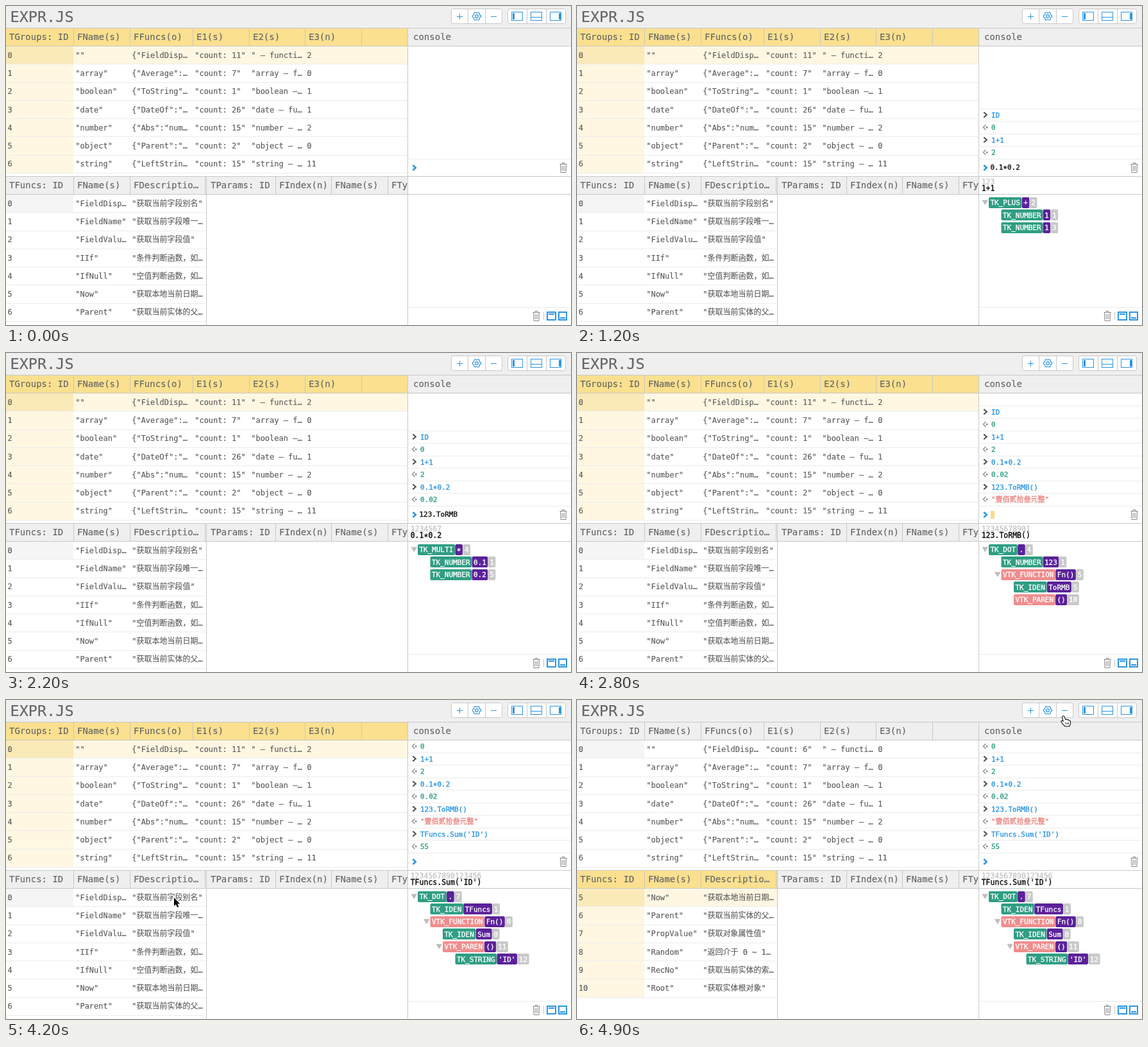
Animation of 881 by 497 pixels, one loop 5 s. Source, as an HTML page with a canvas:

```html
<!DOCTYPE html>
<html lang="en">
<head>
<meta charset="utf-8">
<title>EXPR.JS</title>
<style>
html, body { margin: 0; width: 100%; height: 100%; overflow: hidden; background: #fff; }
canvas { display: block; }
</style>
</head>
<body>
<canvas id="stage" width="881" height="497"></canvas>
<script>
const ctx = document.getElementById('stage').getContext('2d');
const FONT = '"DejaVu Sans Mono", "Noto Sans CJK SC", "Noto Sans CJK", monospace';
const LOOP = 5000, STEP = 100, ROW = 28.25, LOG_ROW = 19.5, CHAR = 6.62;
const C = {
  bar: '#efefef', line: '#c8c8c8', thin: '#ececec', text: '#5c5c5c', head: '#666',
  gold: '#fae08f', cream: '#fff7e2', pick: '#faeab8',
  blue: '#2c95e0', green: '#2f9e83', red: '#e9837f', pink: '#f08d8d',
  purple: '#5b2299', grey: '#c9c9c9'
};

const groups = [
  ['""', '{"FieldDisp…', '"count: 11"', '" – functi…', '2'],
  ['"array"', '{"Average":…', '"count: 7"', '"array – f…', '0'],
  ['"boolean"', '{"ToString"…', '"count: 1"', '"boolean –…', '1'],
  ['"date"', '{"DateOf":"…', '"count: 26"', '"date – fu…', '1'],
  ['"number"', '{"Abs":"num…', '"count: 15"', '"number – …', '2'],
  ['"object"', '{"Parent":"…', '"count: 2"', '"object – …', '0'],
  ['"string"', '{"LeftStrin…', '"count: 15"', '"string – …', '11']
];
const funcs = [
  ['"FieldDisp…', '"获取当前字段别名"'],
  ['"FieldName"', '"获取当前字段唯一…'],
  ['"FieldValu…', '"获取当前字段值"'],
  ['"IIf"', '"条件判断函数，如…'],
  ['"IfNull"', '"空值判断函数，如…'],
  ['"Now"', '"获取本地当前日期…'],
  ['"Parent"', '"获取当前实体的父…'],
  ['"PropValue"', '"获取对象属性值"'],
  ['"Random"', '"返回介于 0 ~ 1…'],
  ['"RecNo"', '"获取当前实体的索…'],
  ['"Root"', '"获取实体根对象"']
];
const numberFns = ['Abs', 'Ceil', 'Cos', 'Exp', 'Floor', 'Ln', 'Log', 'Power', 'Round',
  'Sin', 'Sqrt', 'Tan', 'ToRMB', 'ToString', 'Trunc'];
const arrayFns = ['Average', 'Count', 'Distinct', 'Max', 'Min', 'Sum', 'Where'];

// Evaluated expressions; tree nodes are [depth, token, value, position].
const runs = [
  { at: 300, src: 'ID', out: '0', tree: [[0, 'TK_IDEN', 'ID', 1]] },
  { at: 600, src: '1+1', out: '2',
    tree: [[0, 'TK_PLUS', '+', 2], [1, 'TK_NUMBER', '1', 1], [1, 'TK_NUMBER', '1', 3]] },
  { at: 1300, src: '0.1*0.2', out: '0.02',
    tree: [[0, 'TK_MULTI', '*', 4], [1, 'TK_NUMBER', '0.1', 1], [1, 'TK_NUMBER', '0.2', 5]] },
  { at: 2400, src: '123.ToRMB()', out: '"壹佰贰拾叁元整"',
    tree: [[0, 'TK_DOT', '.', 4], [1, 'TK_NUMBER', '123', 1], [1, 'VTK_FUNCTION', 'Fn()', 5],
      [2, 'TK_IDEN', 'ToRMB', 5], [2, 'VTK_PAREN', '()', 10]] },
  { at: 4000, src: "TFuncs.Sum('ID')", out: '55',
    tree: [[0, 'TK_DOT', '.', 7], [1, 'TK_IDEN', 'TFuncs', 1], [1, 'VTK_FUNCTION', 'Fn()', 8],
      [2, 'TK_IDEN', 'Sum', 8], [2, 'VTK_PAREN', '()', 11], [3, 'TK_STRING', "'ID'", 12]] }
];

// Prompt contents over time, with an optional completion list.
const typing = [
  [0, ''], [100, 'I'], [200, 'ID'], [300, ''], [400, '1'], [500, '1+1'], [600, ''],
  [800, '0'], [900, '0.1'], [1000, '0.1*'], [1100, '0.1*0'], [1200, '0.1*0.2'], [1300, ''],
  [1400, '1'], [1500, '123'], [1600, '123.', numberFns], [1900, '123.T', numberFns],
  [2000, '123.To', numberFns], [2100, '123.ToR', numberFns], [2200, '123.ToRMB'],
  [2300, '123.ToRMB()'], [2400, ''], [3100, 'T'], [3200, 'TFun'], [3300, 'TFuncs'],
  [3400, 'TFuncs.', arrayFns], [3500, 'TFuncs.S', arrayFns], [3600, 'TFuncs.Sum()'],
  [3700, "TFuncs.Sum('')"], [3800, "TFuncs.Sum('I')"], [3900, "TFuncs.Sum('ID')"], [4000, '']
];
const pointerPath = [[4100, 420, 390], [4200, 262, 308], [4300, 528, 88], [4400, 700, 44], [4500, 758, 25]];
const deletions = [[4500, 1], [4600, 2], [4700, 3], [4800, 5]];

const last = (list, t) => list.filter(e => e[0] <= t).pop();

function box(x, y, w, h, color) {
  ctx.fillStyle = color;
  ctx.fillRect(x, y, w, h);
}
const hline = (x, y, w, color = C.line) => box(x, y, w, 1, color);
const vline = (x, y, h, color = C.line) => box(x, y, 1, h, color);

// A hairline outline gives the slightly heavy look of smoothed text.
function label(s, x, cy, size, color, weight = 0.15) {
  const y = Math.round(cy + size * 0.365);
  const shown = s.replaceAll('*', '∗');
  ctx.font = size + 'px ' + FONT;
  ctx.fillStyle = ctx.strokeStyle = color;
  ctx.lineWidth = weight;
  ctx.fillText(shown, x, y);
  ctx.strokeText(shown, x, y);
}
const code = (s, x, cy, color) => label(s, x, cy, 11, color, 0.35);

function round(x, y, w, h, r, fill, stroke) {
  ctx.beginPath();
  ctx.roundRect(x, y, w, h, r);
  if (fill) { ctx.fillStyle = fill; ctx.fill(); }
  if (stroke) { ctx.strokeStyle = stroke; ctx.lineWidth = 1; ctx.stroke(); }
}

function path(points, color, width, close) {
  ctx.beginPath();
  points.forEach(([x, y]) => ctx.lineTo(x, y));
  if (close) ctx.closePath();
  ctx.strokeStyle = color;
  ctx.lineWidth = width;
  ctx.stroke();
}

function clipped(x, y, w, h, draw) {
  ctx.save();
  ctx.beginPath();
  ctx.rect(x, y, w, h);
  ctx.clip();
  draw();
  ctx.restore();
}

function header(x, y, w, names, cols, active) {
  box(x, y, w, 27, active ? C.gold : C.bar);
  clipped(x, y, w, 28, () => {
    cols.forEach(c => vline(c, y, 27));
    names.forEach((n, i) => label(n, i ? cols[i - 1] + 6 : x + (x ? 6 : 5), y + 13, 14, C.head));
  });
  hline(x, y + 27, w);
}

function table(y, w, h, rows, cols, first, active) {
  clipped(0, y, w, h, () => {
    rows.forEach((cells, i) => {
      const top = Math.round(y + i * ROW), end = Math.round(y + (i + 1) * ROW);
      if (active) box(0, top, i ? 105 : w, end - top, C.cream);
      if (!i) box(0, top, 105, end - top, active ? C.pick : '#f5f5f5');
      hline(0, end - 1, w, C.thin);
      const cy = y + i * ROW + 13.6;
      label(String(first + i), 2.5, cy, 12, C.text);
      cells.forEach((s, k) => label(s, cols[k] + 3.2, cy, 12, C.text));
    });
  });
}

function trash(x, y) {
  const g = '#888';
  path([[x - 5.5, y - 5.5], [x + 5.5, y - 5.5]], g, 1);
  path([[x - 2, y - 5.5], [x - 2, y - 7.5], [x + 2, y - 7.5], [x + 2, y - 5.5]], g, 1);
  path([[x - 4.5, y - 5.5], [x - 4, y + 7.5], [x + 4, y + 7.5], [x + 4.5, y - 5.5]], g, 1);
  [-2, 0, 2].forEach(d => path([[x + d, y - 3], [x + d, y + 5]], g, 0.8));
}

function gear(x, y) {
  const pts = [];
  for (let i = 0; i < 48; i++) {
    const a = i / 48 * Math.PI * 2, r = 5.9 + 0.8 * Math.cos(6 * a);
    pts.push([x + r * Math.cos(a), y + r * Math.sin(a)]);
  }
  path(pts, C.blue, 1.2, true);
  ctx.beginPath();
  ctx.arc(x, y, 2.4, 0, 7);
  ctx.stroke();
}

function toolbar() {
  box(0, 0, 881, 34, C.bar);
  label('EXPR.JS', 6.5, 16.5, 23.5, C.head);
  round(694.5, 4.5, 79, 23, 3, '#fff', C.line);
  round(782.5, 4.5, 90, 23, 3, '#fff', C.line);
  [720, 747, 812, 842].forEach(x => vline(x, 5, 22));
  box(703, 16, 9, 1, C.blue);
  box(707, 12, 1, 9, C.blue);
  gear(734, 16);
  box(756, 16, 9, 1, C.blue);
  ctx.strokeStyle = C.blue;
  ctx.lineWidth = 1;
  [788.5, 818.5, 848.5].forEach(x => ctx.strokeRect(x, 9.5, 17, 13));
  box(790, 11, 3, 10, C.blue);
  box(819, 17, 17, 1, C.blue);
  box(862, 11, 3, 10, C.blue);
  hline(0, 34, 881);
}

const chevron = (x, y, color, w) => path([[x, y - 4], [x + 4.5, y], [x, y + 4]], color, w);

function consolePane(t, done) {
  box(627, 35, 254, 27, C.bar);
  label('console', 635, 48, 14, C.head);
  hline(627, 62, 254);
  clipped(627, 63, 254, 176, () => {
    const rows = done.flatMap(r => [[r.src, false], [r.out, true]]);
    hline(627, 238, 254, C.thin);
    rows.reverse().forEach(([s, result], i) => {
      const cy = 228 - i * LOG_ROW;
      hline(627, Math.round(cy - 10), 254, C.thin);
      if (result) {
        path([[637.5, cy - 4], [633.5, cy], [637.5, cy + 4]], '#8c8c8c', 1.4);
        ctx.beginPath();
        ctx.arc(639.2, cy, 1.5, 0, 7);
        ctx.fillStyle = '#8c8c8c';
        ctx.fill();
      } else {
        chevron(634.3, cy, '#555', 2.2);
      }
      code(s, 646, cy, !result ? C.blue : s[0] === '"' ? C.red : C.green);
    });
  });
  chevron(634.3, 252, C.blue, 2.5);
  trash(869, 252);
  hline(627, 265, 254);

  const [, input, list] = last(typing, t);
  code(input, 644.5, 251.4, '#111');
  if (t >= 2600 && t <= 3000) box(645, 246, 6, 12, '#f9dc86');
  if (list) popup(input, list);
}

function popup(input, list) {
  const dot = input.indexOf('.') + 1, part = input.slice(dot);
  const items = list.filter(n => n.startsWith(part));
  if (!items.length) return;
  code(items[0].slice(part.length), 644.5 + input.length * CHAR, 251.4, '#aaa');
  const pitch = 14.67, h = Math.min(157, items.length * pitch + 1);
  const x = 636 + dot * CHAR, y = 244 - h;
  ctx.save();
  ctx.shadowColor = 'rgba(0,0,0,.22)';
  ctx.shadowBlur = 5;
  ctx.shadowOffsetY = 1;
  round(x, y, 98.5, h, 5, '#fff');
  ctx.restore();
  ctx.save();
  round(x, y, 98.5, h, 5, '#fff', '#bbb');
  ctx.clip();
  items.forEach((n, i) => {
    if (!i) box(x, y, 99, 15, C.green);
    code(n, x + 8, y + 7.1 + i * pitch, i ? '#000' : '#fff');
  });
  ctx.restore();
}

function tag(s, x, cy, color) {
  const w = s.length * CHAR + 5;
  round(x, Math.round(cy - 8.3), w, 17, 2, color);
  code(s, x + 2.5, cy, '#fff');
  return x + w + 0.4;
}

function treePane(run) {
  hline(627, 293, 254);
  hline(627, 469, 254, C.thin);
  trash(827, 483);
  vline(838, 477, 12);
  ctx.strokeStyle = C.blue;
  ctx.lineWidth = 2;
  ctx.strokeRect(844, 477, 13, 12);
  ctx.strokeRect(862, 477, 12, 12);
  box(846, 479, 9, 2, C.blue);
  box(864, 485, 8, 2, C.blue);
  if (!run) return;

  const ruler = [...run.src].map((_, i) => (i + 1) % 10).join('');
  label(ruler, 630.7, 273.5, 11.5, '#bdbdbd');
  label(run.src, 630.7, 284.3, 11.5, '#000', 0.3);
  run.tree.forEach(([depth, name, value, pos], i) => {
    const x0 = 642 + depth * 19.5, cy = 306.2 + i * 19.5;
    const next = run.tree[i + 1];
    if (next && next[0] > depth) {
      ctx.beginPath();
      ctx.moveTo(x0 - 10.5, cy - 4);
      ctx.lineTo(x0 - 1, cy - 4);
      ctx.lineTo(x0 - 5.7, cy + 4);
      ctx.fillStyle = '#bdbdbd';
      ctx.fill();
    }
    let x = tag(name, x0, cy, name[0] === 'V' ? C.pink : C.green);
    x = tag(value, x, cy, C.purple);
    tag(String(pos), x, cy, C.grey);
  });
}

function shape(x, y, d, fill, stroke, width) {
  const p = new Path2D(d);
  ctx.save();
  ctx.translate(x, y);
  ctx.lineJoin = 'round';
  ctx.lineWidth = width;
  ctx.strokeStyle = stroke;
  ctx.stroke(p);
  ctx.fillStyle = fill;
  ctx.fill(p);
  ctx.restore();
}

function pointer(t) {
  const p = last(pointerPath, t);
  if (!p) return;
  const [at, x, y] = p;
  if (at < 4500) {
    shape(x, y, 'M0 0V13L3 10.2L5 15L7.3 14L5.2 9.4H9.2Z', '#000', '#fff', 2);
  } else {
    shape(x, y, 'M-1 1.5Q0 -.5 1.5 1L3.2 6Q5 5 6 6.3Q8 5.7 8.7 7.2Q11 7 11 9V12L9.5 15.5H3' +
      'L-1.5 10.5Q-3.5 8 -1.8 7.8L.8 9Z', '#fff', '#000', 2);
    [4, 6.3, 8.5].forEach(d => path([[x + d, y + 10], [x + d, y + 13]], '#000', 0.8));
  }
}

function draw(t) {
  const done = runs.filter(r => r.at <= t);
  const lower = t >= 4300;
  const gone = (last(deletions, t) || [0, 0])[1];
  const rows = groups.map(r => r.slice());
  rows[0][2] = `"count: ${11 - gone}"`;
  rows[0][4] = String(Math.min(2, 5 - gone));

  box(0, 0, 881, 497, '#fff');
  toolbar();
  const cols = [105, 193, 291, 379, 466, 554];
  header(0, 35, 626, ['TGroups: ID', 'FName(s)', 'FFuncs(o)', 'E1(s)', 'E2(s)', 'E3(n)'], cols, !lower);
  table(63, 626, 202, rows, cols, 0, !lower);
  hline(0, 265, 626);
  header(0, 266, 312, ['TFuncs: ID', 'FName(s)', 'FDescriptio…'], [105, 193, 310], lower);
  table(294, 312, 203, funcs.slice(gone), cols, gone, lower);
  header(313, 266, 313, ['TParams: ID', 'FIndex(n)', 'FName(s)', 'FTy'], [420, 507, 595], false);
  vline(312, 266, 231);
  vline(626, 35, 462);
  treePane(done[done.length - 1]);
  consolePane(t, done);
  pointer(t);
}

function tick() {
  const t = performance.now() % LOOP;
  draw(Math.floor(t / STEP) * STEP);
  requestAnimationFrame(tick);
}
tick();
</script>
</body>
</html>
```
